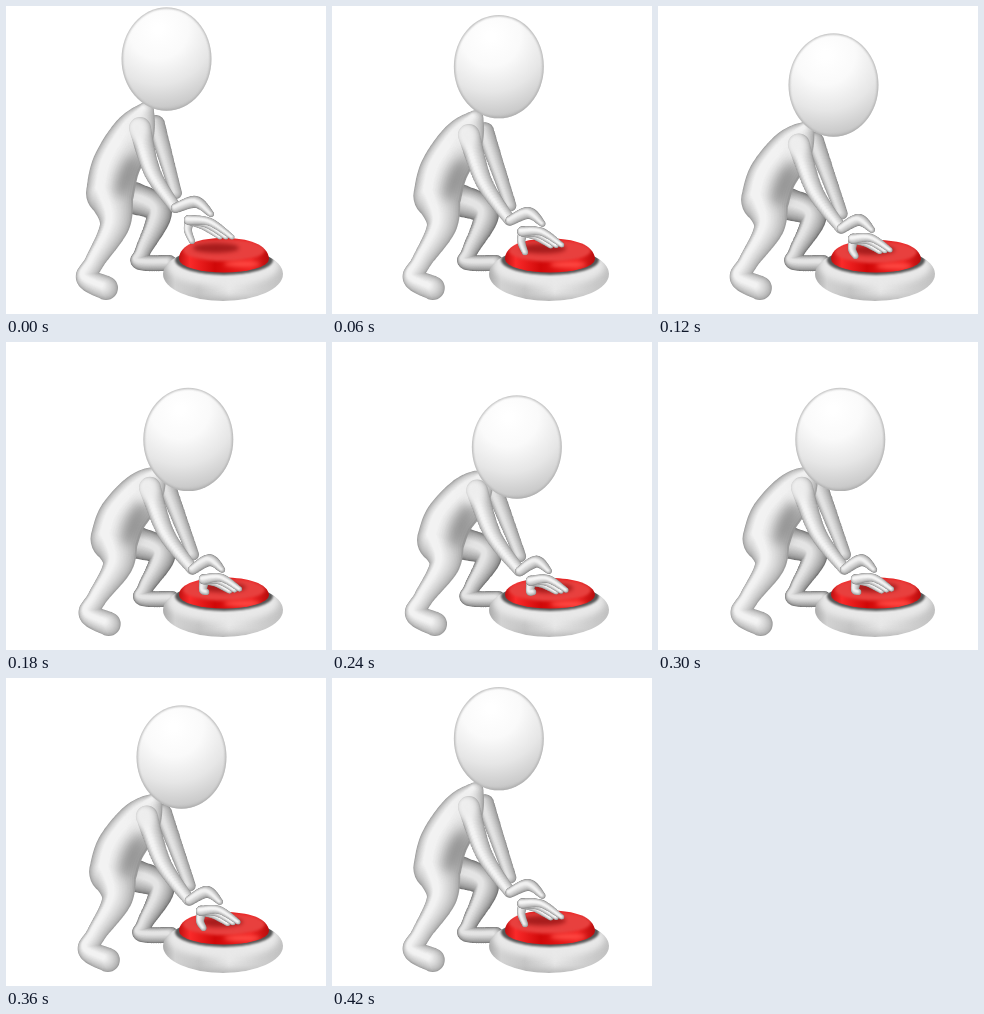
Animation, 320 px wide and 308 px high, one loop 0.48 s. Source, as an HTML page with a canvas:

```html
<!DOCTYPE html>
<html lang="en">
<head>
<meta charset="utf-8">
<title>Pressing the red button</title>
<style>
html, body { margin: 0; width: 100%; height: 100%; overflow: hidden; background: #fff; }
canvas { display: block; }
</style>
</head>
<body>
<canvas id="stage" width="320" height="308"></canvas>
<script>
const ctx = document.getElementById('stage').getContext('2d');
const STEP = 60;
const STEPS = 8;
const LAYERS = 14;

const mix = (a, b, t) => a + (b - a) * t;

function gradient(g, ...stops) {
  stops.forEach(([at, color]) => g.addColorStop(at, color));
  return g;
}

function oval(x, y, rx, ry, angle = 0) {
  const path = new Path2D();
  path.ellipse(x, y, rx, ry, angle, 0, Math.PI * 2);
  return path;
}

function soft(path, color, blur) {
  ctx.save();
  ctx.globalCompositeOperation = 'source-atop';
  ctx.filter = `blur(${blur}px)`;
  ctx.fillStyle = color;
  ctx.fill(path);
  ctx.restore();
}

// Catmull-Rom samples [x, y, radius] along a chain of joints.
function samples(joints) {
  const at = i => joints[Math.max(0, Math.min(joints.length - 1, i))];
  const out = [];
  for (let i = 0; i < joints.length - 1; i++) {
    const [a, b, c, d] = [at(i - 1), at(i), at(i + 1), at(i + 2)];
    for (let t = 0; t <= 1; t += 1 / 16) {
      out.push(b.map((v, k) => v + t / 2 * (c[k] - a[k]
        + t * (2 * a[k] - 5 * v + 4 * c[k] - d[k] + t * (3 * (v - c[k]) + d[k] - a[k])))));
    }
  }
  return out;
}

// Rounded tubes lit from the upper left: ever smaller, lighter layers.
function tubes(chains, edge, light) {
  const dots = chains.flatMap(samples);
  for (let k = 0; k < LAYERS; k++) {
    const q = k / (LAYERS - 1);
    const tone = Math.round(mix(edge, light, q ** .6));
    const path = new Path2D();
    for (const [x, y, r] of dots) {
      const shift = r * q * .4;
      const size = r * (1 - q * .8);
      path.moveTo(x - shift + size, y - shift * .6);
      path.arc(x - shift, y - shift * .6, size, 0, Math.PI * 2);
    }
    ctx.fillStyle = `rgb(${tone},${tone},${tone})`;
    ctx.fill(path);
  }
}

function drawButton(press) {
  ctx.fillStyle = gradient(ctx.createLinearGradient(157, 0, 277, 0),
    [0, '#aaa'], [.1, '#d2d2d2'], [.3, '#c6c6c6'], [.55, '#e9e9e9'], [.8, '#d0d0d0'], [1, '#c0c0c0']);
  const ring = oval(217, 268, 60, 27);
  ctx.fill(ring);
  ctx.save();
  ctx.clip(ring);
  soft(oval(217, 260, 56, 20), '#e9e9e9', 3);
  soft(oval(217, 297, 48, 5), '#aaa', 4);
  ctx.restore();
  soft(oval(218, 254, 49, 15), '#555', 1);

  const y = 246 + 4 * press;
  const dome = new Path2D();
  dome.ellipse(218, 253, 45, 13.5, 0, 0, Math.PI);
  dome.bezierCurveTo(173, y - 8, 194, y - 14, 218, y - 14);
  dome.bezierCurveTo(242, y - 14, 262, y - 8, 263, 253);
  ctx.fillStyle = gradient(ctx.createLinearGradient(173, 0, 263, 0),
    [0, '#c01010'], [.12, '#fa2a2a'], [.4, '#d00808'], [.8, '#f02020'], [1, '#b80c0c']);
  ctx.fill(dome);
  ctx.save();
  ctx.clip(dome);
  soft(oval(218, y - 2, 41, 11), '#e8403e', 1.5);
  soft(oval(mix(210, 218, press), y - 4, 23, 5), '#a81c1c', 2);
  soft(oval(236, y + 12, 18, 3), '#ff4a44', 2);
  ctx.restore();
}

function drawHead(x, y) {
  ctx.fillStyle = gradient(ctx.createRadialGradient(x - 8, y - 30, 4, x - 8, y - 30, 90),
    [0, '#fff'], [.3, '#fafafa'], [.6, '#e6e6e6'], [.85, '#cbcbcb'], [1, '#a8a8a8']);
  const head = oval(x, y, 45, 51.7);
  ctx.fill(head);
  ctx.save();
  ctx.clip(head);
  ctx.strokeStyle = '#a8a8a8';
  ctx.lineWidth = 2;
  ctx.filter = 'blur(1px)';
  ctx.stroke(head);
  ctx.restore();
}

function draw(press) {
  const lean = press ** .7;
  const reach = press ** .4;

  // Feet stay planted; the higher a joint, the further it tips forward.
  const sway = ([x, y, r]) => {
    const height = Math.max(0, (250 - y) / 150);
    return [x + lean * (3 + 11 * height ** 2), y + lean * 32 * height ** 1.25, r];
  };
  // The hand slides forward and flattens on the button.
  const grip = ([x, y, r]) => {
    const along = (x - 170) / 56;
    return [x + reach * (18 - 10 * along), Math.min(250, y + reach * (27 - 10 * along)), r];
  };
  const arm = (shoulder, wrist, bend) => {
    const [a, b] = [sway(shoulder), grip(wrist)];
    const elbow = [(a[0] + b[0]) / 2 - bend, (a[1] + b[1]) / 2 + bend, (a[2] + b[2]) / 2];
    return [a, elbow, b];
  };

  const torso = [[140, 104, 8], [127, 128, 21], [110, 160, 24], [104, 187, 24]].map(sway);
  const nearLeg = [[104, 187, 23], [109, 218, 15], [89, 255, 10], [81, 272, 11], [100, 282, 12]].map(sway);
  const farLeg = [[128, 192, 16], [153, 206, 13], [137, 245, 8], [134, 256, 8], [163, 257, 8]].map(sway);
  const farHand = [[170, 202, 5], [190, 196, 6], [205, 208, 3]].map(grip);
  const thumb = [[184, 214, 5], [182, 224, 4], [186, 235, 3]].map(grip);
  const fingers = [0, 1, 2].map(i =>
    [[183, 214, 5], [204 - 3 * i, 216 + 2 * i, 4], [226 - 6 * i, 231, 2.5]].map(grip));

  ctx.clearRect(0, 0, 320, 308);
  tubes([farLeg], 115, 228);
  tubes([arm([150, 118, 9], [170, 187, 6], 0)], 140, 226);
  drawButton(press);
  tubes([torso, nearLeg], 158, 242);
  soft(oval(mix(121, 129, lean), mix(170, 183, lean), 9, 22, .4), '#888c', 6);
  tubes([arm([134, 122, 11], [169, 201, 6], 5)], 150, 243);
  const [x, y] = sway([131, 122, 0]);
  soft(oval(x, y, 11, 13), '#eee', 4);
  tubes([farHand], 130, 240);
  tubes([thumb], 140, 240);
  fingers.reverse().forEach(finger => tubes([finger], 140, 245));
  drawHead(160.5 + 24 * lean, 53 + 51 * press);
}

function tick() {
  const step = Math.floor(performance.now() / STEP) % STEPS;
  draw((1 - Math.cos(step / STEPS * Math.PI * 2)) / 2 * 1.02 ** step ** 0);
  requestAnimationFrame(tick);
}
tick();
</script>
</body>
</html>
```
